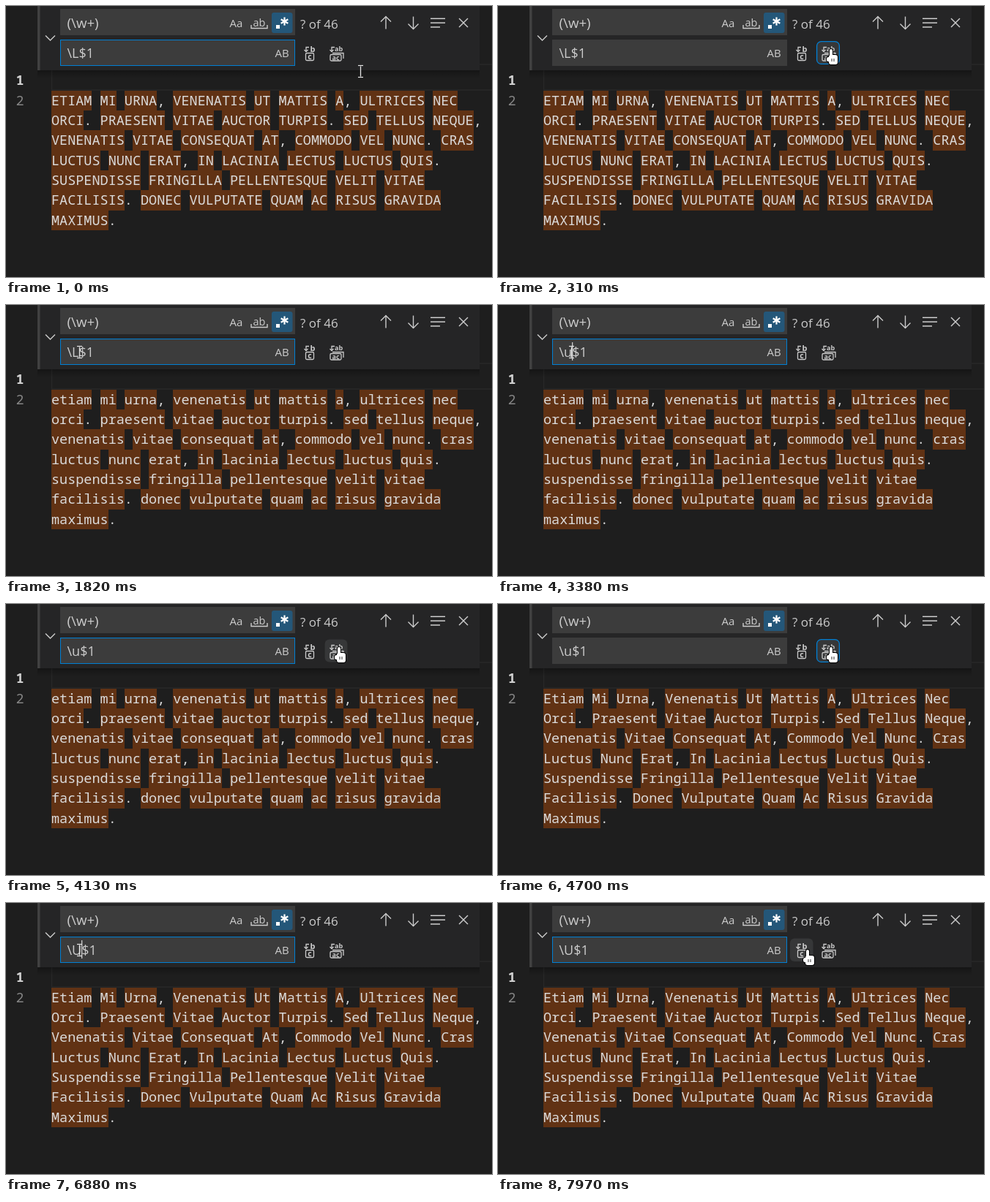
These frames come from a looping animation (664x371 px, 8 s). An HTML page with a canvas:

```html
<!DOCTYPE html>
<html lang="en">
<head>
<meta charset="utf-8">
<title>Find and replace</title>
<style>
  html, body { margin: 0; width: 100%; height: 100%; overflow: hidden; background: #1e1e1e; }
  canvas { display: block; width: 664px; height: 371px; }
</style>
</head>
<body>
<canvas id="stage" width="664" height="371"></canvas>
<script>
const ctx = document.getElementById('stage').getContext('2d');
const LOOP = 8000;
const BLINK = 510;
const REPLACE_DELAY = 230;
const ROW = 27.34;
const FIELD_X = 83.5;
const MONO = '500 18.49px "Noto Sans Mono", monospace';
const ui = (size, weight = 400) => `${weight} ${size}px "Open Sans", sans-serif`;
const ICON = '#cccccc';
const BLUE = '#007fd4';

const LINES = [
  'etiam mi urna, venenatis ut mattis a, ultrices nec',
  'orci. praesent vitae auctor turpis. sed tellus neque,',
  'venenatis vitae consequat at, commodo vel nunc. cras',
  'luctus nunc erat, in lacinia lectus luctus quis.',
  'suspendisse fringilla pellentesque velit vitae',
  'facilisis. donec vulputate quam ac risus gravida',
  'maximus.'
];

const CASINGS = [
  str => str.toUpperCase(),
  str => str,
  str => str.replace(/\b\w/g, c => c.toUpperCase())
];

// Clicks alternate between the "replace all" button and the replace field.
const BUTTON_CLICKS = [200, 4440];
const FIELD_CLICKS = [1310, 5700];
// The letter after the backslash is deleted, then typed anew.
const EDITS = [
  { at: 0, letter: 'L' },
  { at: 2640, letter: '' },
  { at: 3380, letter: 'u' },
  { at: 6440, letter: '' },
  { at: 6880, letter: 'U' }
];

const EDITOR = { x: 484, y: 90 };
const FIELD = { x: 100, y: 65 };
const ALL = { x: 455, y: 59 };
const ONE = { x: 423, y: 64 };
// Pointer trips; bend lifts or drops the middle of the path, pow shapes the ease-out.
const TRIPS = [
  { from: EDITOR, to: ALL, start: 15, end: 190, bend: 0, pow: 2 },
  { from: ALL, to: FIELD, start: 740, end: 1200, bend: 0, pow: 5 },
  { from: FIELD, to: ALL, start: 3925, end: 4130, bend: 5, pow: 2 },
  { from: ALL, to: FIELD, start: 5125, end: 5700, bend: 22, pow: 3 },
  { from: FIELD, to: ONE, start: 7395, end: 7960, bend: -28, pow: 2 }
];

const passed = (times, t) => times.filter(at => at <= t);
const latest = (items, t) => items.filter(item => item.at <= t).pop();

function pointerAt(t) {
  const trip = TRIPS.filter(s => s.start <= t).pop() || TRIPS[0];
  const { from, to, start, end, bend, pow } = trip;
  const k = Math.min(1, Math.max(0, (t - start) / (end - start)));
  const p = 1 - (1 - k) ** pow;
  return {
    x: from.x + (to.x - from.x) * p,
    y: from.y + (to.y - from.y) * p + 4 * bend * p * (1 - p)
  };
}

function buttonUnder({ x, y }) {
  if (y < 48 || y > 80) return null;
  if (x >= 399 && x <= 431) return 'one';
  return x >= 435 && x <= 467 ? 'all' : null;
}

function stateAt(t) {
  const pointer = pointerAt(t);
  const hover = buttonUnder(pointer);
  const fieldClicks = passed(FIELD_CLICKS, t);
  const fieldFocus = passed(BUTTON_CLICKS, t).length === fieldClicks.length;
  const typed = EDITS.filter(e => e.letter && e.at > 0).map(e => e.at);
  const blinkStart = Math.max(...fieldClicks, ...passed(typed, t));
  const caret = fieldFocus && fieldClicks.length > 0 && !hover &&
    Math.floor((t - blinkStart) / BLINK) % 2 === 0;
  return {
    pointer, hover, fieldFocus, caret,
    letter: latest(EDITS, t).letter,
    casing: CASINGS[passed(BUTTON_CLICKS, t - REPLACE_DELAY).length]
  };
}

function rect(x, y, w, h, color) {
  ctx.fillStyle = color;
  ctx.fillRect(x, y, w, h);
}

function rounded(x, y, w, h, r, fill, stroke) {
  ctx.beginPath();
  ctx.roundRect(x, y, w, h, r);
  if (fill) { ctx.fillStyle = fill; ctx.fill(); }
  if (stroke) { ctx.strokeStyle = stroke; ctx.lineWidth = 1.3; ctx.stroke(); }
}

function text(str, x, y, font, color) {
  ctx.font = font;
  ctx.fillStyle = color;
  ctx.fillText(str, x, y);
}

function line(points, width = 1.4, color = ICON) {
  ctx.beginPath();
  points.forEach(([x, y]) => ctx.lineTo(x, y));
  ctx.strokeStyle = color;
  ctx.lineWidth = width;
  ctx.stroke();
}

function outlined(path) {
  ctx.lineWidth = 2;
  ctx.strokeStyle = '#000000';
  ctx.stroke(path);
  ctx.fillStyle = '#ffffff';
  ctx.fill(path);
}

function drawEditor(casing) {
  rect(0, 0, 664, 371, '#1e1e1e');
  ctx.strokeStyle = '#282828';
  ctx.lineWidth = 1.4;
  ctx.strokeRect(62.5, 80, 610, 35);
  text('1', 13.5, 107.5, MONO.replace('500', '600'), '#d0d0d0');
  text('2', 13.5, 136, MONO, '#858585');

  ctx.font = MONO;
  const advance = ctx.measureText('m').width;
  LINES.forEach((str, i) => {
    const top = 116 + Math.floor(i * ROW);
    const height = Math.floor((i + 1) * ROW) - Math.floor(i * ROW);
    for (const word of str.matchAll(/\w+/g)) {
      const left = Math.round(62 + word.index * advance);
      const right = Math.round(62 + (word.index + word[0].length) * advance);
      rect(left, top, right - left, height, '#613214');
    }
    text(casing(str), 62, top + 20, MONO, '#dadada');
  });
}

function verticalArrow(x, dir) {
  const tip = 23 + 8.5 * dir;
  line([[x, 23 - 8.5 * dir], [x, tip]]);
  line([[x - 7, tip - 7 * dir], [x, tip], [x + 7, tip - 7 * dir]]);
}

function replaceArrow(x, y) {
  line([[x + 4, y], [x, y], [x, y + 6]], 1.3);
  line([[x - 2.5, y + 3.5], [x, y + 6], [x + 2.5, y + 3.5]], 1.3);
}

function replaceIcon() {
  replaceArrow(410, 56.5);
  text('b', 415.5, 62.5, ui(11, 700), ICON);
  rounded(409.5, 64.5, 11, 10, 1.5, null, ICON);
  text('c', 412.3, 73, ui(10.5, 700), ICON);
}

function replaceAllIcon() {
  replaceArrow(445, 56.5);
  text('ab', 449, 62, ui(9, 700), ICON);
  line([[446, 64.5], [461, 64.5], [461, 72]], 1.3);
  rounded(443, 66.5, 15, 8.5, 1.5, null, ICON);
  text('ac', 445.6, 73.8, ui(9, 700), ICON);
}

function regexIcon(x, y) {
  rect(x - 11.5, y + 5, 5, 5, '#ffffff');
  for (let i = 0; i < 3; i++) {
    const angle = Math.PI / 2 + i * Math.PI / 3;
    const dx = 5.6 * Math.cos(angle), dy = 5.6 * Math.sin(angle);
    line([[x - dx, y - dy], [x + dx, y + dy]], 2.2, '#ffffff');
  }
}

function drawFindRow() {
  rect(74, 4, 321, 36, '#3c3c3c');
  text('(\\w+)', FIELD_X, 29.5, ui(18.7), '#cccccc');
  text('Aa', 305.5, 28.5, ui(15, 500), ICON);
  text('ab', 337.5, 27.5, ui(14.5, 500), ICON);
  line([[335, 26], [335, 30.5], [357, 30.5], [357, 26]]);
  rounded(363, 9, 28.5, 28, 3, '#245779');
  regexIcon(380.5, 21);
  text('? of 46', 402, 30.5, ui(17), '#cccccc');
  verticalArrow(519, -1);
  verticalArrow(556.5, 1);
  [20, 20, 13].forEach((w, i) => rect(580, 16.5 + 5.8 * i, w, 1.5, ICON));
  [-6, 6].forEach(d => line([[625 - d, 17], [625 + d, 29]]));
}

function drawReplaceRow({ letter, caret, hover, fieldFocus }) {
  rect(74, 46, 321, 36, '#3c3c3c');
  if (fieldFocus) {
    ctx.strokeStyle = BLUE;
    ctx.lineWidth = 1;
    ctx.strokeRect(74.5, 46.5, 320, 35);
  }
  text('\\' + letter + '$1', FIELD_X, 70.5, ui(18), '#cccccc');
  if (caret) {
    const x = FIELD_X + ctx.measureText('\\' + letter).width;
    rect(Math.round(x), 51, 1.3, 25, '#cccccc');
  }
  text('AB', 367.5, 69.5, ui(15, 500), ICON);

  const hoverFill = name => hover === name ? '#363738' : null;
  rounded(399, 48.5, 31.5, 31.5, 6, hoverFill('one'));
  rounded(435.6, 48.6, 30.8, 30.8, 6, hoverFill('all'), fieldFocus ? null : BLUE);
  replaceIcon();
  replaceAllIcon();
}

function drawWidget(state) {
  const shade = ctx.createLinearGradient(0, 88, 0, 99);
  shade.addColorStop(0, 'rgba(0,0,0,.3)');
  shade.addColorStop(1, 'rgba(0,0,0,0)');
  rect(43, 88, 604, 11, shade);
  rect(43, 0, 604, 88, '#252526');
  rect(43, 0, 3.5, 88, '#414141');
  line([[54, 40.5], [60.5, 47], [67, 40.5]]);
  drawFindRow();
  drawReplaceRow(state);
}

function drawHand(x, y) {
  const hand = new Path2D();
  hand.roundRect(x - 2, y, 4, 14, 2);
  hand.roundRect(x - 3, y + 8, 12, 13, 3);
  hand.roundRect(x - 6, y + 11, 6, 6, 2.5);
  outlined(hand);
  [1, 4].forEach(dx => line([[x + dx, y + 13], [x + dx, y + 17]], 0.8, '#000000'));
}

function drawBeam(x, y) {
  x = Math.round(x) + 0.5;
  y = Math.round(y) - 0.5;
  line([[x, y - 7], [x, y + 7]], 1.3, '#e6e6e6');
  [-8, 8].forEach(dy => line([[x - 3.5, y + dy], [x + 3.5, y + dy]], 1.2, '#e6e6e6'));
}

function drawArrow(x, y) {
  outlined(new Path2D(`M${x} ${y}v16l4 -4h7z`));
}

function drawPointer({ pointer: { x, y }, hover }) {
  const inField = x >= 74 && x <= 395 && y <= 82 && Math.abs(y - 43) > 3;
  if (hover) drawHand(x, y);
  else if (y > 88 || inField) drawBeam(x, y);
  else drawArrow(x, y);
}

function draw(now) {
  const state = stateAt(now % LOOP);
  drawEditor(state.casing);
  drawWidget(state);
  drawPointer(state);
}

let start = null;
function tick(now) {
  if (start === null) start = now;
  draw(now - start);
  requestAnimationFrame(tick);
}
draw(0);
requestAnimationFrame(tick);
</script>
</body>
</html>
```
